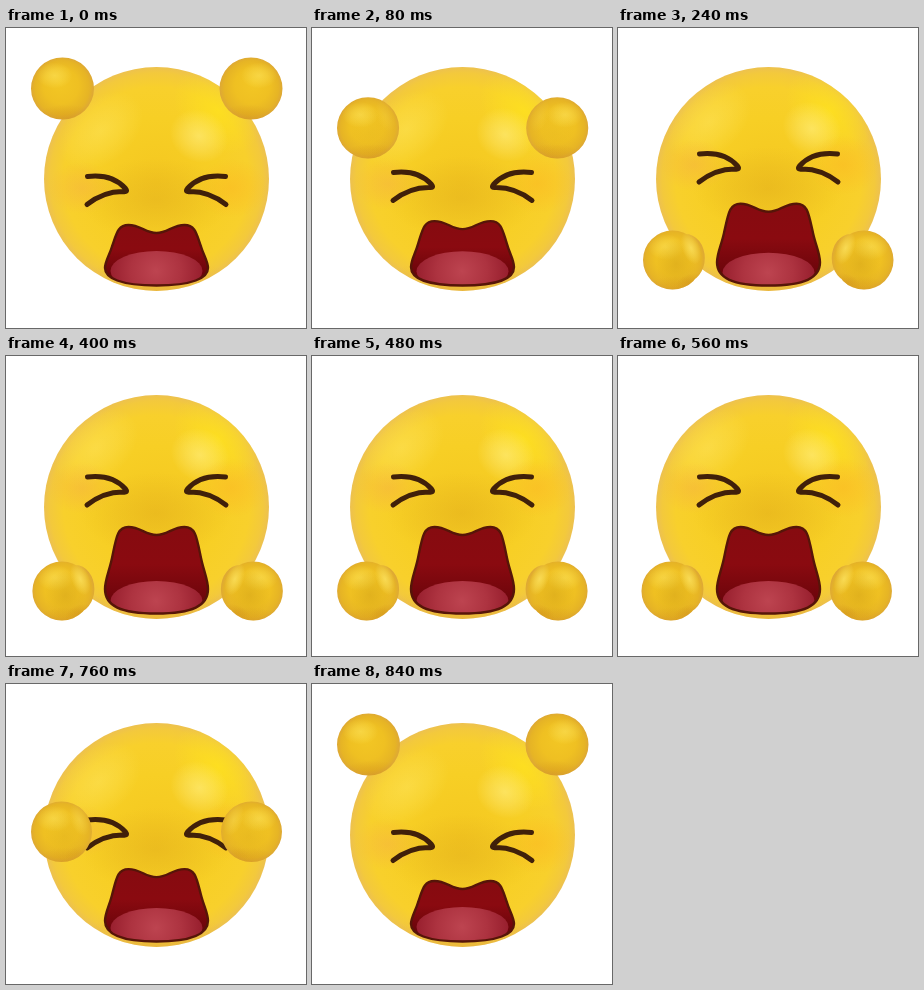
Write an HTML page with a canvas that moves like this. It is 300 by 300 pixels and loops after 880 ms.

```html
<!DOCTYPE html>
<html lang="en">
<head>
<meta charset="utf-8">
<title>Crying face</title>
<style>
html, body { margin: 0; width: 100%; height: 100%; overflow: hidden; background: #fff; }
canvas { display: block; width: 300px; height: 300px; }
</style>
</head>
<body>
<canvas id="stage" width="300" height="300"></canvas>
<script>
const ctx = document.getElementById('stage').getContext('2d');
const LOOP = 880, STEP = 40, TAU = Math.PI * 2;

const mix = (a, b, k) => a + (b - a) * k;
const smooth = (a, b, t) => {
  const k = Math.min(1, Math.max(0, (t - a) / (b - a)));
  return k * k * (3 - 2 * k);
};

// The lowered fists tremble sideways, five swings per loop.
const tremble = t =>
  t > 240 && t < 680 ? 5.2 * Math.sin(TAU * (5 * t / LOOP - 0.23)) : 0;

function radial(x, y, r, stops, fx = x, fy = y) {
  const g = ctx.createRadialGradient(fx, fy, 0, x, y, r);
  stops.forEach(([at, color]) => g.addColorStop(at, color));
  return g;
}

function ellipse(x, y, rx, ry, fill) {
  ctx.beginPath();
  ctx.ellipse(x, y, rx, ry, 0, 0, TAU);
  ctx.fillStyle = fill;
  ctx.fill();
}

// Soft elliptical patch of light or colour.
function glow(x, y, rx, ry, rgb, alpha, angle = 0) {
  ctx.save();
  ctx.translate(x, y);
  ctx.rotate(angle);
  ctx.scale(rx, ry);
  ellipse(0, 0, 1, 1, radial(0, 0, 1, [
    [0, `rgba(${rgb},${alpha})`],
    [0.5, `rgba(${rgb},${alpha * 0.55})`],
    [1, `rgba(${rgb},0)`]
  ]));
  ctx.restore();
}

function drawHead(p) {
  ctx.save();
  ctx.beginPath();
  ctx.ellipse(150.5, 151, 112.5, 112, 0, 0, TAU);
  ctx.clip();
  ctx.fillStyle = radial(150.5, 151, 113, [
    [0, '#f4c720'], [0.55, '#f7cf25'], [0.82, '#f8d02c'], [0.94, '#f3c93c'], [1, '#ecc052']
  ], 150, 155);
  ctx.fillRect(0, 0, 300, 300);
  glow(150, mix(172, 158, p), 75, 42, '222,170,28', 0.4);
  glow(150, 272, 100, 42, '226,160,30', 0.4);
  glow(212, 82, 50, 38, '255,228,28', 0.7, 0.8);
  glow(mix(193, 194, p), mix(108, 99, p), 30, 26, '255,236,125', 0.65, 0.5);
  glow(mix(95, 90, p), mix(103, 92, p), 48, 32, '255,232,100', 0.45, -0.7);
  const cheekY = mix(160, 132, p);
  glow(76, cheekY, 34, 26, '246,178,66', 0.5);
  glow(225, cheekY, 36, 30, '252,184,34', 0.55);
  ctx.restore();
}

function drawEyes(p) {
  const y = mix(162.5, 135, p);
  ctx.strokeStyle = '#40200a';
  ctx.lineWidth = 5;
  ctx.lineCap = ctx.lineJoin = 'round';
  for (const side of [-1, 1]) {
    const x = d => 150.5 + side * d;
    ctx.beginPath();
    ctx.moveTo(x(69), y - 14);
    ctx.bezierCurveTo(x(52), y - 16, x(39), y - 11, x(31), y - 2);
    ctx.quadraticCurveTo(x(28), y + 2, x(34), y + 1);
    ctx.bezierCurveTo(x(46), y + 1, x(58), y + 5, x(69.5), y + 14);
    ctx.stroke();
  }
}

// Traces one half of the mouth outline from the upper notch to the chin.
function mouthPath(p) {
  const top = mix(197, 171, p);
  const low = mix(240, 233, p);
  const shoulder = mix(top, low, 0.5);
  const half = side => {
    const x = d => 150.5 + side * d;
    ctx.moveTo(x(0), top + 8);
    ctx.bezierCurveTo(x(11), top + 8, x(16), top, x(28), top);
    ctx.bezierCurveTo(x(39), top, x(40), top + 9, x(44.5), shoulder);
    ctx.bezierCurveTo(x(47), mix(shoulder, low, 0.4), x(51.5), mix(shoulder, low, 0.7), x(51.5), low);
    ctx.bezierCurveTo(x(51.5), 250, x(36), 257.5, x(0), 257.5);
  };
  ctx.beginPath();
  half(-1);
  half(1);
}

function drawMouth(p) {
  const top = mix(197, 171, p);
  ctx.save();
  mouthPath(p);
  ctx.clip();
  const inside = ctx.createLinearGradient(0, top, 0, 245);
  inside.addColorStop(0, '#860b10');
  inside.addColorStop(0.5, '#8a0a10');
  inside.addColorStop(1, '#6c050b');
  ctx.fillStyle = inside;
  ctx.fillRect(90, 160, 122, 105);
  const tongueY = mix(243, 245, p);
  ellipse(150.5, tongueY, 46, 20, radial(150, tongueY, 46, [
    [0, '#bd4450'], [0.55, '#ad3340'], [1, '#981f2e']
  ]));
  ctx.restore();
  mouthPath(p);
  ctx.strokeStyle = '#561508';
  ctx.lineWidth = 2.4;
  ctx.stroke();
}

function drawFist(x, y, side, lowered) {
  ctx.save();
  ctx.translate(x, y);
  ctx.scale(side, 1);
  ctx.beginPath();
  ctx.ellipse(mix(0, -1.5, lowered), 0, mix(31.5, 29.5, lowered), mix(31, 29.5, lowered), 0, 0, TAU);
  ctx.ellipse(mix(0, 12, lowered), mix(0, -2, lowered), 19, 24, 0, 0, TAU);
  ctx.clip();
  ctx.fillStyle = radial(0, 0, 32, [
    [0, '#f3c724'], [0.55, '#efc022'], [0.85, '#e6b425'], [1, '#dca638']
  ], -3, -6);
  ctx.fillRect(-33, -33, 66, 66);
  glow(4, 30, 34, 14, '208,140,20', 0.35);
  glow(-8, -13, 18, 13, '255,232,100', 0.5);
  ctx.globalAlpha = lowered;
  glow(2, 4, 20, 24, '206,156,22', 0.45);
  glow(17, -12, 9, 17, '255,234,110', 0.65, -0.35);
  glow(15, 22, 14, 8, '206,142,24', 0.4, -0.4);
  ctx.restore();
}

function draw(time) {
  const t = Math.floor((time % LOOP) / STEP) * STEP;
  const face = smooth(0, 330, t) * (1 - smooth(670, 840, t));
  const drop = smooth(0, 260, t) * (1 - smooth(680, 840, t));
  const shift = tremble(t);
  const y = mix(60.5, 235, drop);

  ctx.fillStyle = '#fff';
  ctx.fillRect(0, 0, 300, 300);
  drawHead(face);
  drawEyes(face);
  drawMouth(face);
  drawFist(mix(56.5, 56, drop) + shift, y, 1, drop);
  drawFist(mix(245, 244.5, drop) + shift, y, -1, drop);
}

const start = performance.now();
function tick() {
  draw(performance.now() - start);
  requestAnimationFrame(tick);
}
tick();
</script>
</body>
</html>
```
